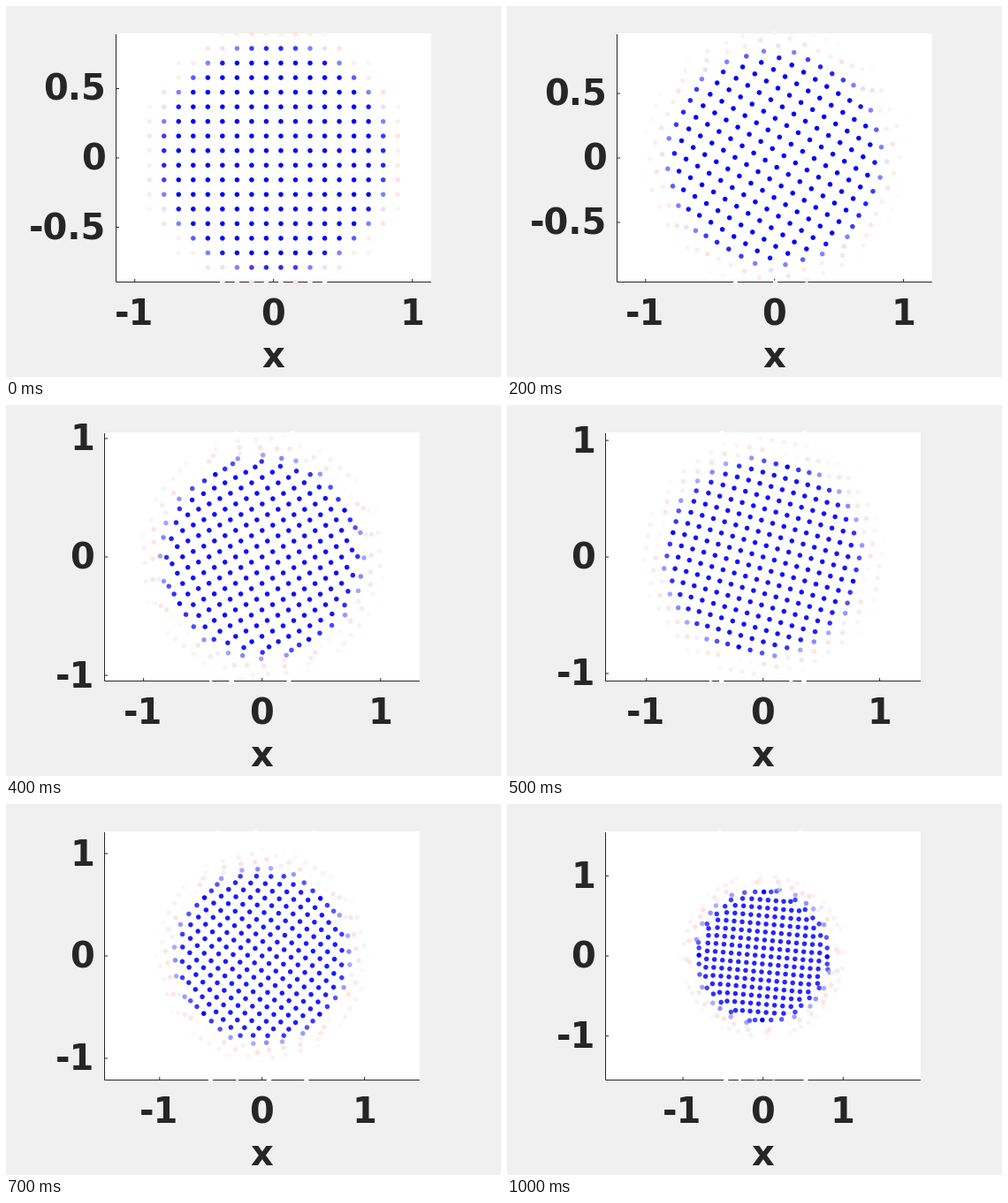
A matplotlib script that plays this animation: 560 by 420 pixels, repeating every 1.1 s.

```python
import numpy as np
import matplotlib.pyplot as plt
from matplotlib.animation import FuncAnimation
from matplotlib.patches import Rectangle

W, H, DPI = 560, 420, 100
FRAMES, STEP = 11, 100
INK = (0.15, 0.15, 0.15)
MID, HALF_W, HALF_H = 172, 178.2, 140.5
SPIN = 31.8  # degrees the vortex core turns per time step


def phase(i):
    """Time steps since the last remeshing, half height of the view, remeshed?"""
    if i < 3:
        return i / 2, 17 / 19 + 0.034 * i, False
    if i < 5:
        return i - 2, 1.131 - 0.083 * (i - 3), True
    return (i - 4) / 2, 1.065 + 0.485 * ((i - 5) / 5) ** 1.3, True


def lattice(remeshed, reach):
    axis = np.arange(-20, 21) / 10 if remeshed else np.arange(-19, 20, 2) / 19
    x, y = (g.ravel() for g in np.meshgrid(axis, axis))
    r, a = np.hypot(x, y), np.arctan2(y, x)
    keep = r <= reach
    return r[keep], a[keep]


def strength(i, r, a, remeshed):
    s = 0.98 * r if remeshed else r
    core = 1 - 0.015 * i if remeshed else 1
    v = core * 0.5 * (1 - np.tanh((s - 0.832) / 0.046))
    v -= 0.15 * np.exp(-((s - 0.91) / 0.035) ** 2)
    v += 0.05 * np.exp(-((s - 0.975) / 0.03) ** 2)
    if remeshed:  # overshoot where the axes meet the patch edge
        v[np.isclose(r, 0.8) & np.isclose(np.sin(2 * a), 0)] = 1
    return np.clip(v, -1, 1)


def particles(i):
    steps, view, remeshed = phase(i)
    r, a = lattice(remeshed, 1.09 * view)
    v = strength(i, r, a, remeshed)
    lag = (1 + (r / 0.806) ** 24) ** (-1 / 12)  # outside, speed falls as 1/r^2
    a = a - np.radians(SPIN * steps) * lag
    x, y = r * np.cos(a), r * np.sin(a)
    keep = abs(y) <= view + 0.005
    return x[keep], y[keep], v[keep]


def colours(v):
    fade = 1 - abs(v)
    return np.column_stack([np.where(v > 0, fade, 1), fade,
                            np.where(v > 0, 1, fade)])


fig = plt.figure(figsize=(W / DPI, H / DPI), dpi=DPI, facecolor="#f0f0f0")
ax = fig.add_axes([0, 0, 1, 1])


def label(x, y, text, ha="center"):
    ax.text(x - 0.7, y, text, ha=ha, va="baseline", color=INK,
            fontsize=40 * 72 / DPI, family="DejaVu Sans", weight="bold")


def line(x, y):
    ax.plot(x, y, color=INK, lw=0.72, solid_capstyle="butt", snap=False, zorder=2)


def draw(i):
    ax.clear()
    ax.set(xlim=(0, W), ylim=(H, 0))
    ax.axis("off")
    _, view, _ = phase(i)
    unit = 0.5 if view < 1 else 1
    left = 124.5 if view < 1 else 111.5
    cx, top, base = left + HALF_W, MID - HALF_H, MID + HALF_H
    scale = HALF_H / view
    ax.add_patch(Rectangle((left, top - 0.5), 2 * HALF_W, 2 * HALF_H + 0.5,
                           fc="white", lw=0, snap=False, zorder=1))
    line([left, left], [top + 0.5, base])
    line([left, left + 2 * HALF_W], [base, base])

    for t in (-1, 0, 1):
        x, y = cx + t * scale, MID - t * unit * scale
        line([x, x], [base, base - 3.5])
        label(x, 361, f"{t}")
        line([left, left + 3.5], [y, y])
        label(left - 10.5, y + 13.5, f"{t * unit:g}", "right")
    label(cx, 409, "x")

    x, y, v = particles(i)
    ax.scatter(cx + x * scale, MID - y * scale, s=(5.5 * 72 / DPI) ** 2,
               c=colours(v), lw=0, zorder=3)
    return []


anim = FuncAnimation(fig, draw, frames=FRAMES, init_func=lambda: [],
                     interval=STEP, repeat=True, repeat_delay=0)
plt.show()
```
